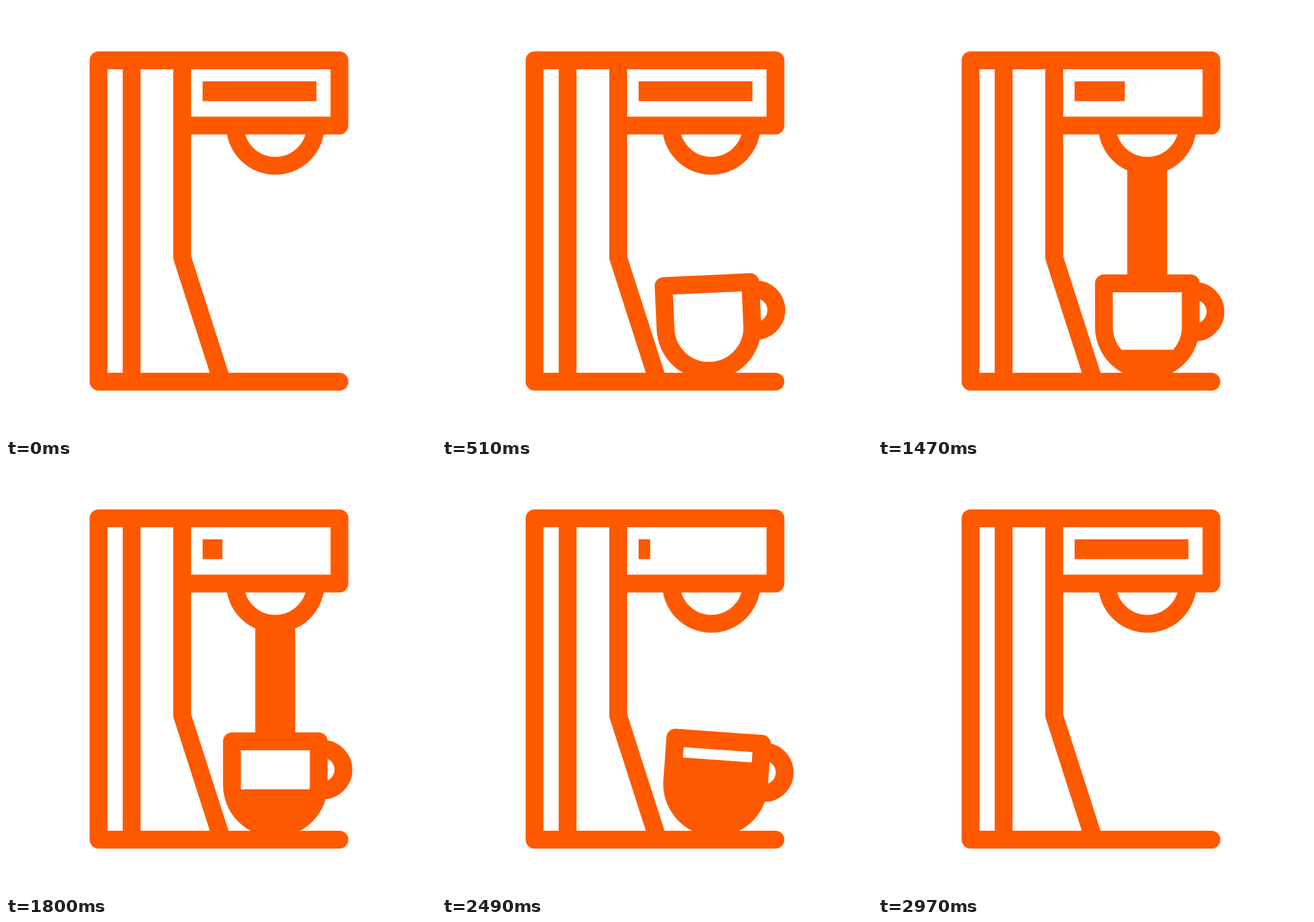
Animation, 748 px wide and 748 px high, one loop 3.63 s. Source, as an HTML page:

```html
<!DOCTYPE html>
<html lang="en">
<head>
<meta charset="utf-8">
<title>Coffee machine</title>
<style>
  html, body { margin: 0; width: 100%; height: 100%; overflow: hidden; background: #fff; }
  svg { display: block; width: 100%; height: 100%; }
  .line { fill: none; stroke: #ff5900; stroke-width: 31; stroke-linejoin: round; }
  .solid { fill: #ff5900; }
</style>
</head>
<body>
<svg viewBox="0 0 748 748">
  <defs>
    <path id="body" d="M393 482.5H544V558A75.5 75.5 0 0 1 393 558Z"/>
    <clipPath id="inside"><use href="#body"/></clipPath>
  </defs>

  <rect id="stream" class="solid" x="433.5" width="69.5"/>

  <g class="line">
    <path d="M580 653.5H161V94.5H580V208H306.5" stroke-linecap="round"/>
    <path d="M218.5 94.5V653.5"/>
    <path d="M306.5 94.5V437.5L375.8 653.5" stroke-linejoin="miter"/>
    <path d="M398.5 208A70 70 0 0 0 538.5 208"/>
  </g>
  <rect id="bar" class="solid" x="342" y="131" height="34.5"/>

  <g id="cup">
    <g clip-path="url(#inside)">
      <rect id="coffee" class="solid" x="393" width="151"/>
    </g>
    <use href="#body" class="line"/>
    <path class="line" d="M551 495.8A36 36 0 0 1 551 567.8"/>
  </g>
</svg>
<script>
const LOOP = 3630, STEP = 30;
const $ = id => document.getElementById(id);
const stream = $('stream'), bar = $('bar'), cup = $('cup'), coffee = $('coffee');

const linear = u => u;
const sine = u => (1 - Math.cos(Math.PI * u)) / 2;
const quadOut = u => 1 - (1 - u) ** 2;
const cubicIn = u => u ** 3;
const cubicInOut = u => u < .5 ? 4 * u ** 3 : 1 - 4 * (1 - u) ** 3;

// Each key is [time, value, easing towards this key].
const tracks = {
  slide:  [[150, 400], [480, 0, quadOut], [2440, 0], [2845, 400, cubicIn]],
  tilt:   [[150, 0], [300, 5, sine], [544, -3, sine], [665, 0, sine],
           [2310, 0], [2560, 5, sine], [2800, 0, sine]],
  head:   [[660, 275], [1260, 485]],
  tail:   [[1890, 275], [2310, 485]],
  level:  [[1260, 618.5], [2310, 516]],
  charge: [[780, 198], [1890, 20], [2460, 20], [2970, 198, cubicInOut]]
};

function at(keys, t) {
  if (t <= keys[0][0]) return keys[0][1];
  for (let i = 1; i < keys.length; i++) {
    const [t0, v0] = keys[i - 1], [t1, v1, ease = linear] = keys[i];
    if (t < t1) return v0 + (v1 - v0) * ease((t - t0) / (t1 - t0));
  }
  return keys[keys.length - 1][1];
}

function draw(t) {
  const v = {};
  for (const name in tracks) v[name] = at(tracks[name], t);

  bar.setAttribute('width', v.charge);
  stream.setAttribute('y', v.tail);
  stream.setAttribute('height', Math.max(0, v.head - v.tail));
  coffee.setAttribute('y', v.level);
  coffee.setAttribute('height', 650 - v.level);
  cup.setAttribute('transform', `translate(${v.slide} 0) rotate(${v.tilt} 490 650)`);
  cup.style.display = t < 180 || t >= 2850 ? 'none' : '';
}

const start = performance.now();
function tick() {
  const t = (performance.now() - start) % LOOP;
  draw(Math.floor(t / STEP) * STEP);
  requestAnimationFrame(tick);
}
tick();
</script>
</body>
</html>
```
